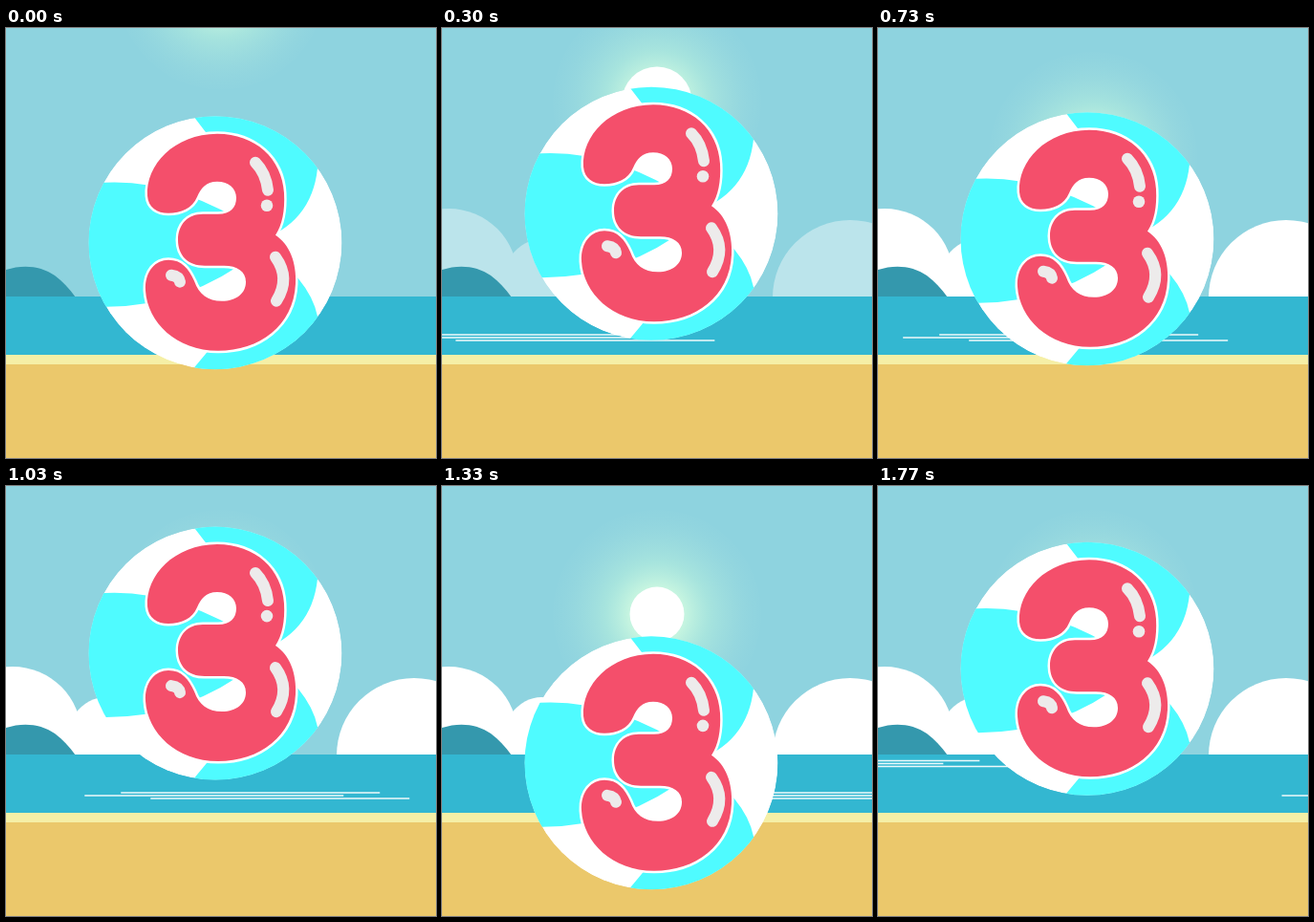
An HTML page that plays this animation: 450x450 px, repeating every 1810 ms.

```html
<!DOCTYPE html>
<html lang="en">
<head>
<meta charset="utf-8">
<title>Beach ball</title>
<style>
  html, body { margin: 0; width: 100%; height: 100%; overflow: hidden; background: #8ed3df; }
  svg { display: block; width: 100vw; height: 100vh; }
</style>
</head>
<body>
<svg viewBox="0 0 450 450">
  <defs>
    <radialGradient id="halo">
      <stop offset=".27" stop-color="#c8f6e0" stop-opacity=".95"/>
      <stop offset=".5" stop-color="#b4eddd" stop-opacity=".65"/>
      <stop offset=".75" stop-color="#a6e2de" stop-opacity=".4"/>
      <stop offset="1" stop-color="#98d8df" stop-opacity=".1"/>
    </radialGradient>
    <clipPath id="round"><circle cx="219" cy="225" r="132.5"/></clipPath>
    <path id="waves" d="M0 321h271M-38 324h271M31 327h271"/>
  </defs>

  <rect width="450" height="282" fill="#8ed3df"/>
  <g id="sun">
    <circle r="109" fill="url(#halo)"/>
    <circle id="disc" fill="#fff"/>
  </g>
  <g id="clouds" fill="#fff">
    <circle cx="7" cy="261" r="72"/>
    <ellipse cx="104" cy="281" rx="45" ry="60"/>
    <circle cx="427" cy="282" r="81"/>
  </g>
  <path d="M0 253C18 247 37 249 51 259Q63 268 73 282H0Z" fill="#3498ad"/>
  <rect y="281" width="450" height="63" fill="#33b7d1"/>
  <g stroke="#eefafb" stroke-width="1.5">
    <use id="near" href="#waves"/>
    <use id="far" href="#waves"/>
  </g>
  <rect y="342" width="450" height="10" fill="#f5efa6"/>
  <rect y="352" width="450" height="98" fill="#ebc86b"/>

  <g id="ball">
    <g clip-path="url(#round)">
      <circle cx="219" cy="225" r="132.5" fill="#fff"/>
      <g fill="#4ffbff">
        <path d="M195 91L208 108Q245 150 262 224Q320 205 326 147L352 92Z"/>
        <path d="M80 162H103Q180 158 262 212V236Q190 292 105 292L80 296Z"/>
        <path d="M195 358L210 340Q250 300 262 224Q318 262 326 302L352 358Z"/>
      </g>
    </g>
    <path fill="#f44f6b" stroke="#fff" stroke-width="5" stroke-linejoin="round" paint-order="stroke"
      d="M148 176C146 144 176 111 221 111C261 111 289 137 291 173
         C292 192 289 206 282 217C297 227 304 246 303 268C301 312 265 338 222 338
         C178 338 148 308 146 275C145 254 157 243 170 243C184 243 191 252 197 265
         C202 279 211 286 226 286C241 286 251 278 251 266C251 255 242 249 228 249H208
         C190 249 180 238 180 222C180 206 190 195 206 195H222C235 195 241 188 241 178
         C241 168 233 161 221 161C209 161 204 168 200 177C195 189 183 194 170 194
         C158 194 149 188 148 176Z"/>
    <path fill="none" stroke="#edebeb" stroke-width="12" stroke-linecap="round"
      d="M261 141Q272 152 274 170M282 240Q298 262 283 286M173 259Q181 260 182 266"/>
    <circle cx="273" cy="186" r="6.3" fill="#edebeb"/>
  </g>
</svg>
<script>
const LOOP = 1810;
const $ = id => document.getElementById(id);
const move = (id, x, y) => $(id).setAttribute('transform', `translate(${x} ${y})`);
const clamp = v => Math.min(1, Math.max(0, v));
const smooth = v => v * v * (3 - 2 * v);

// Monotone cubic curve through [time, value] points
function curve(pts) {
  const n = pts.length - 1;
  const slope = i => (pts[i + 1][1] - pts[i][1]) / (pts[i + 1][0] - pts[i][0]);
  const tangent = pts.map((_, i) => {
    if (i === 0) return slope(0);
    if (i === n) return slope(n - 1);
    const a = slope(i - 1), b = slope(i);
    return a * b <= 0 ? 0 : 2 * a * b / (a + b);
  });
  return t => {
    let i = 0;
    while (i < n - 1 && t > pts[i + 1][0]) i++;
    const [t0, a] = pts[i], [t1, b] = pts[i + 1];
    const h = t1 - t0, u = (t - t0) / h, v = 1 - u;
    return a * v * v * (1 + 2 * u) + b * u * u * (3 - 2 * u)
      + h * u * v * (tangent[i] * v - tangent[i + 1] * u);
  };
}

const ballY = curve([[0, 225], [180, 170], [300, 194], [530, 284], [565, 289], [730, 221],
  [970, 171], [1030, 175], [1320, 291], [1330, 290], [1690, 175], [1770, 191], [1810, 205]]);
const waveX = curve([[0, -330], [300, -17], [530, 31], [730, 64], [1030, 120],
  [1330, 230], [1770, 460], [1810, 482]]);

function draw(now) {
  const t = now % LOOP;
  move('ball', 0, ballY(t) - 225);
  move('sun', 225, 134 - 179 * (1 - clamp(t / 690)) ** 2);
  $('disc').setAttribute('r', 36.6 - 8.1 * smooth(clamp((t - 530) / 800)));
  $('clouds').setAttribute('opacity', smooth(clamp(t / 700)));
  move('near', waveX(t), 0);
  move('far', waveX(Math.max(0, t - 1635)), -33.5);
  requestAnimationFrame(draw);
}
requestAnimationFrame(draw);
</script>
</body>
</html>
```
